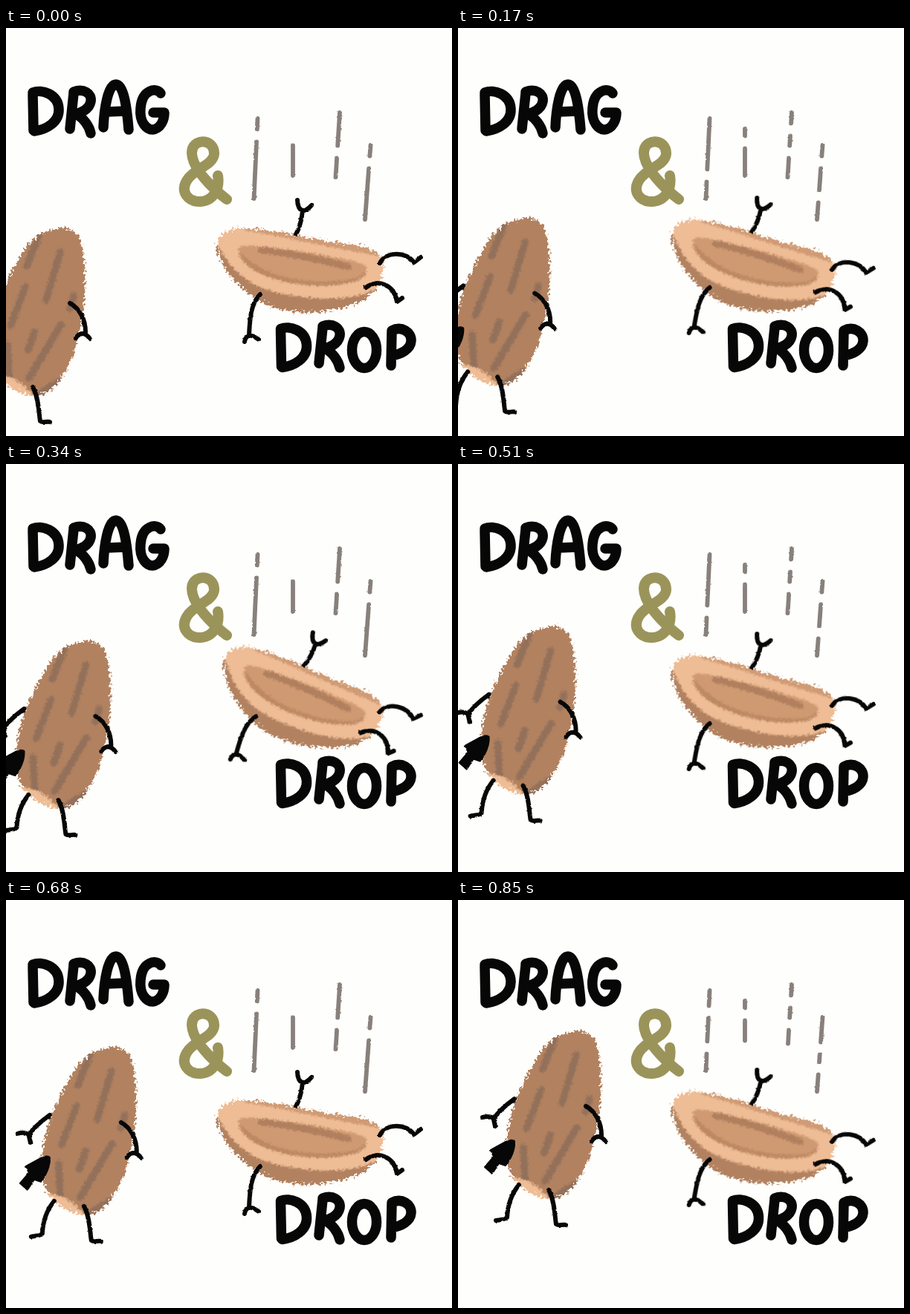
An HTML page that plays this animation: 600x550 px, repeating every 1020 ms.

```html
<!DOCTYPE html>
<html lang="en">
<head>
<meta charset="utf-8">
<title>Drag &amp; Drop</title>
<style>
  html, body { margin: 0; width: 100%; height: 100%; overflow: hidden; background: #fefefc; }
  svg { display: block; width: 600px; height: 550px; }
  .ink { fill: none; stroke: #070707; stroke-linecap: round; stroke-linejoin: round; }
  .letters { stroke-width: 13.5; }
  .limbs { stroke-width: 6; }
  .and { stroke: #9b945a; stroke-width: 14; }
  .pointer { fill: #070707; stroke-width: 2; }
  .stripes { fill: none; stroke: #93705a; stroke-width: 9.5; stroke-linecap: round; }
</style>
</head>
<body>
<svg viewBox="0 0 600 550" role="img" aria-label="DRAG &amp; DROP">
  <defs>
    <filter id="fuzzy" filterUnits="userSpaceOnUse" x="-20" y="140" width="640" height="300" color-interpolation-filters="sRGB">
      <feTurbulence type="fractalNoise" baseFrequency=".28" numOctaves="2" seed="4"/>
      <feDisplacementMap in="SourceGraphic" scale="14" xChannelSelector="R" yChannelSelector="G"/>
    </filter>
    <filter id="crayon" filterUnits="userSpaceOnUse" x="-20" y="140" width="640" height="300" color-interpolation-filters="sRGB">
      <feTurbulence type="fractalNoise" baseFrequency=".28" numOctaves="2" seed="7" result="noise"/>
      <feGaussianBlur in="SourceGraphic" stdDeviation="1"/>
      <feDisplacementMap in2="noise" scale="6" xChannelSelector="R" yChannelSelector="G"/>
    </filter>
    <filter id="rough" filterUnits="userSpaceOnUse" x="-20" y="50" width="640" height="480" color-interpolation-filters="sRGB">
      <feTurbulence type="fractalNoise" baseFrequency=".2" numOctaves="2" seed="9"/>
      <feDisplacementMap in="SourceGraphic" scale="2.5" xChannelSelector="R" yChannelSelector="G"/>
    </filter>
    <mask id="shell" maskUnits="userSpaceOnUse" x="0" y="140" width="600" height="300">
      <path filter="url(#fuzzy)" fill="#fff" d="M158 177C172 174 183 183 188 200C195 234 193 285 184 320C177 352 166 380 140 399C128 405 104 404 82 384C64 370 63 335 67 312C70 288 84 249 102 220C113 199 126 181 158 177Z"/>
    </mask>
    <mask id="half" maskUnits="userSpaceOnUse" x="0" y="140" width="600" height="300">
      <path filter="url(#fuzzy)" fill="#fff" d="M284 297C284 277 298 270 318 270C345 270 385 278 430 287C460 291 485 293 500 303C512 312 509 333 499 350C488 367 465 376 435 381C410 386 385 384 362 377C332 367 306 343 293 321C287 311 284 305 284 297Z"/>
    </mask>
    <path id="D" d="M36 89L37 138M36 87C48 82 70 89 71 109C72 127 54 137 38 139"/>
    <path id="R" d="M91 88L86 136M91 86C104 81 116 88 114 99C112 110 100 115 92 116M94 116C104 121 112 132 114 142"/>
  </defs>

  <g class="ink letters">
    <use href="#D"/>
    <use href="#R"/>
    <path d="M131 134C132 110 137 76 148 76C159 76 163 112 165 137M136 113L160 112"/>
    <path d="M208 88C203 80 183 82 181 108C179 128 190 137 197 137C208 136 213 124 213 114L198 114"/>
    <path class="and" d="M297 231C280 218 250 190 250 168C250 148 281 148 280 170C279 185 252 190 243 206C234 222 246 234 260 234C278 234 288 218 285 199"/>
    <use href="#D" x="333.5" y="318.5"/>
    <use href="#R" x="335" y="316"/>
    <ellipse cx="482" cy="434" rx="16.5" ry="24.5"/>
    <path d="M519 409L518 455M519 408C532 401 546 410 545 422C544 434 530 440 521 441"/>
  </g>

  <path id="dashes" filter="url(#rough)" fill="none" stroke="#88807b" stroke-width="5.8" stroke-linecap="round"/>

  <g id="dropped">
    <g mask="url(#half)">
      <path fill="#b28260" d="M260 240H530V410H260Z"/>
      <g filter="url(#crayon)">
        <path fill="#eebc95" d="M275 255L520 280V335C505 352 482 361 452 364C415 367 367 361 337 347C312 334 298 317 288 298L275 285Z"/>
        <path fill="#d09b74" d="M322 262C370 266 450 278 515 288V311C490 304 460 300 430 294C395 287 355 278 322 273Z"/>
        <path fill="#bd8963" d="M313 301C312 292 325 293 345 295C390 299 445 308 474 316C490 321 488 334 472 341C445 350 405 349 374 342C345 335 315 321 313 301Z"/>
        <path fill="#cf9a72" d="M313 301C312 292 325 293 345 295C390 299 445 308 474 316C490 321 487 330 472 336C445 344 407 343 377 336C350 330 326 314 313 301Z"/>
        <path fill="none" stroke="#b07f5e" stroke-width="9" stroke-linecap="round" d="M343 299C385 304 425 313 461 322"/>
      </g>
    </g>
    <g class="ink limbs" filter="url(#rough)">
      <path d="M390 278C396 268 398 256 399 246M392 232C392 240 395 246 400 246C405 246 408 242 411 239"/>
      <path d="M342 359C330 370 328 390 327 414M321 423C322 415 328 413 334 416L340 420"/>
      <path d="M503 317C510 302 536 300 549 316L558 309"/>
      <path d="M484 350C500 338 522 345 526 369L533 364"/>
    </g>
  </g>

  <g id="dragged">
    <g mask="url(#shell)">
      <path fill="#b28260" d="M40 150H220V430H40Z"/>
      <g filter="url(#crayon)">
        <path class="stripes" d="M130 188L114 228M159 209L140 274M112 256L92 308M124 317L116 341M88 333L90 374M160 307L117 379M177 268L172 285M156 384L130 401"/>
        <path fill="#eebd96" d="M55 373C85 371 112 381 130 415H55Z"/>
      </g>
    </g>
    <g class="ink limbs" filter="url(#rough)">
      <path d="M172 278C185 285 193 300 193 317M180 325C185 317 193 317 199 326"/>
      <path d="M76 268C65 276 55 284 48 295M33 293C40 291 47 292 48 296L50 305"/>
      <path d="M82 384C72 396 67 410 66 428C63 431 57 431 51 432"/>
      <path d="M122 391C130 405 130 425 132 437C135 440 140 437 145 438"/>
      <path class="pointer" d="M76 325Q73 322 64 326L44 337L48 346L36 360L46 369L55 355L64 358L70 349Q77 336 76 325Z"/>
    </g>
  </g>
</svg>
<script>
  const STEP = 170, STEPS = 6, GAP = 8.5;
  const byId = id => document.getElementById(id);

  // A fall line runs from top to bottom; gaps are the heights where the pen lifts.
  const falls = [
    { top: [338.5, 122], end: [333.5, 230], even: [145], odd: [199], last: [151, 199] },
    { top: [386, 136], end: [386, 199], even: [150], odd: [154], last: [154, 198] },
    { top: [449, 114], end: [443.5, 201], even: [167], odd: [137, 167], last: [137, 167, 202] },
    { top: [490.5, 158], end: [483, 258], even: [181], odd: [181, 227], last: [200, 227] }
  ];

  function dashes({ top: [x0, y0], end: [x1, y1] }, gaps) {
    const point = y => (x0 + (x1 - x0) * (y - y0) / (y1 - y0)).toFixed(1) + ' ' + y;
    let from = y0, d = '';
    for (const gap of [...gaps, y1 + GAP]) {
      const to = Math.min(gap - GAP, y1);
      if (to - from > 6) d += `M${point(from)}L${point(to)}`;
      from = gap + GAP;
    }
    return d;
  }

  let shown = -1;
  function draw(t) {
    const k = Math.floor(t / STEP) % STEPS;
    if (k === shown) return;
    shown = k;
    const u = k / (STEPS - 1);
    // Dragged up to the right, with a slow start.
    byId('dragged').setAttribute('transform', `translate(${-86 * (1 - u)} ${93 * (1 - u ** 1.2)})`);
    // Rocks back and forth in a triangle wave.
    byId('dropped').setAttribute('transform', `rotate(${6.3 * (2 - Math.abs(2 - k % 4))} 424 324)`);
    const look = u === 1 ? 'last' : k % 2 ? 'odd' : 'even';
    byId('dashes').setAttribute('d', falls.map(f => dashes(f, f[look])).join(''));
  }

  const start = performance.now();
  function tick() {
    draw(performance.now() - start);
    requestAnimationFrame(tick);
  }
  tick();
</script>
</body>
</html>
```
